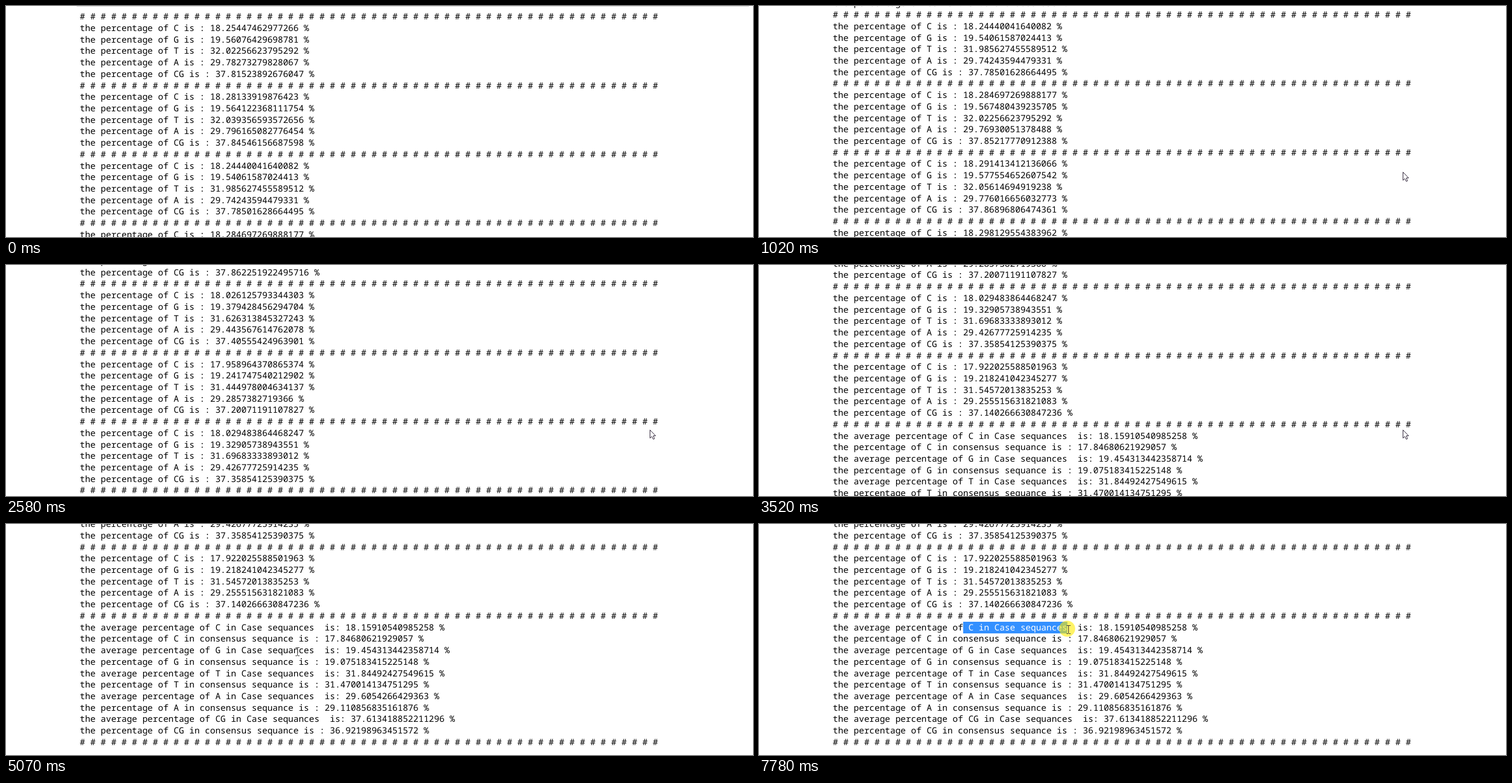
These frames come from a looping animation (1280x397 px, 8 s). An HTML page with a canvas:

```html
<!DOCTYPE html>
<html lang="en">
<head>
<meta charset="utf-8">
<title>Base percentages</title>
<style>
  html, body { margin: 0; width: 100%; height: 100%; overflow: hidden; background: #fff; }
  canvas { display: block; }
</style>
</head>
<body>
<canvas id="stage" width="1280" height="397"></canvas>
<script>
const ctx = document.getElementById('stage').getContext('2d');
const LOOP = 8000, FRAME = 78, WIDTH = 1280, HEIGHT = 397;
const LEFT = 126.6, CHAR = 8.929, LINE = 19.72, BASELINE = 23.25;
const NOTCH = 115.95; // scroll distance of one wheel notch

// Percentages follow from base counts (C, G, T, A) and the sequence length.
const BASES = ['C', 'G', 'T', 'A', 'CG'];
const withPair = ([c, g, t, a]) => [c, g, t, a, c + g];
const percentages = (counts, length) => withPair(counts.map(n => n / length * 100));

const samples = [
  [5436, 5825, 9536, 8869], [5444, 5826, 9541, 8873],
  [5433, 5819, 9525, 8857], [5445, 5827, 9536, 8865],
  [5447, 5830, 9546, 8867], [5449, 5826, 9532, 8867],
  [5368, 5771, 9418, 8768], [5348, 5730, 9364, 8721],
  [5369, 5756, 9439, 8763], [5337, 5723, 9394, 8712]
].map(counts => percentages(counts, 29779));
const consensus = percentages([5303, 5668, 9351, 8650], 29714);
const averages = withPair([0, 1, 2, 3].map(i => samples.reduce((sum, s) => sum + s[i], 0) / samples.length));

const rule = '# '.repeat(56).trim();
const lines = [
  ...samples.flatMap(values => [rule, ...values.map((v, i) => `the percentage of ${BASES[i]} is : ${v} %`)]),
  rule,
  ...BASES.flatMap((base, i) => [
    `the average percentage of ${base} in Case sequances  is: ${averages[i]} %`,
    `the percentage of ${base} in consensus sequance is : ${consensus[i]} %`
  ]),
  rule
];
const SELECTED_LINE = 6 * samples.length + 1, SELECTED_FROM = 25;

// Each move: first step time, last step time, target.
const scrolls = [
  [630, 860, 2], [1020, 1170, 3], [1790, 1950, 4],
  [2330, 2580, 6], [3210, 3520, 8], [4210, 4380, 9]
];
const POINTER_START = [1134, 315];
const SWEEP = 4610, PRESS = 7070;
const pointerMoves = [
  [70, 320, [1103.5, 285.5]], [1470, 1470, [1103.5, 283.5]],
  [SWEEP, 5070, [499.5, 219]], [5150, 5380, [467.5, 202.5]],
  [5460, 5690, [353.5, 176.5]], [5910, 6070, [366.5, 176]],
  [6300, 6380, [341.5, 175.5]], [6690, 6760, [355.5, 179.5]],
  [7240, 7320, [433.5, 179.5]], [7550, 7550, [486.5, 179.5]],
  [7700, 7780, [530.5, 180.5]]
];

const smooth = p => p * p * (3 - 2 * p);
const mix = (a, b, p) => a + (b - a) * p;

// Progress of a move that advances once per screen frame; lead shortens the first step.
function progress(t, [start, end], lead = 0) {
  if (t < start) return 0;
  if (t >= end) return 1;
  const count = Math.round((end - start) / FRAME) + 1;
  const done = 1 + Math.floor((t - start) * (count - 1) / (end - start) + 0.02);
  return (done - lead) / (count - lead);
}

const scrollAt = t => NOTCH * scrolls.reduce(
  (notches, move) => mix(notches, move[2], smooth(progress(t, move, 0.62))), 0);

const pointerAt = t => pointerMoves.reduce((from, move) => {
  const p = progress(t, move), eased = move[0] === SWEEP ? smooth(p) : p;
  return from.map((v, axis) => mix(v, move[2][axis], eased));
}, POINTER_START);

const baselineOf = (line, scroll) => Math.round(BASELINE + line * LINE - scroll);

function drawArrow(x, y) {
  const outline = [[0, 0], [0, 14], [3.2, 11.2], [5.6, 16], [7.8, 15], [5.6, 10.2], [9.6, 10]];
  ctx.beginPath();
  outline.forEach(([dx, dy]) => ctx.lineTo(x + dx, y + dy));
  ctx.closePath();
  ctx.fillStyle = '#fff';
  ctx.fill();
  ctx.strokeStyle = '#2b2035';
  ctx.lineWidth = 1;
  ctx.stroke();
}

function drawBeam(x, y) {
  const cx = Math.floor(x), top = Math.round(y - 7);
  ctx.fillStyle = '#3c3c3c';
  ctx.fillRect(cx, top, 1, 14);
  for (const edge of [top, top + 14]) {
    ctx.fillRect(cx - 3, edge, 3, 1);
    ctx.fillRect(cx + 1, edge, 3, 1);
  }
}

function drawLines(scroll, color) {
  ctx.fillStyle = color;
  lines.forEach((text, i) => {
    const y = baselineOf(i, scroll);
    if (y > -8 && y < HEIGHT + 16) ctx.fillText(text, LEFT, y);
  });
}

function drawSelection(x, scroll) {
  const length = Math.round((x - LEFT) / CHAR) - SELECTED_FROM;
  if (length <= 0) return;
  ctx.save();
  ctx.beginPath();
  ctx.rect(LEFT + SELECTED_FROM * CHAR, baselineOf(SELECTED_LINE, scroll) - 15, length * CHAR, 20);
  ctx.clip();
  ctx.fillStyle = '#3390ff';
  ctx.fillRect(0, 0, WIDTH, HEIGHT);
  drawLines(scroll, '#fff');
  ctx.restore();
}

function drawPressMark(x, y) {
  ctx.fillStyle = 'rgba(255, 235, 0, 0.6)';
  ctx.beginPath();
  ctx.arc(x - 2.5, y - 0.5, 13.8, 0, Math.PI * 2);
  ctx.fill();
}

function draw(t) {
  const scroll = scrollAt(t), [x, y] = pointerAt(t);
  ctx.fillStyle = '#fff';
  ctx.fillRect(0, 0, WIDTH, HEIGHT);
  ctx.fillStyle = '#cfcfcf';
  ctx.fillRect(121, -scroll, 1152, 1);

  ctx.font = '14.88px "Noto Sans Mono", monospace';
  ctx.textRendering = 'geometricPrecision';
  drawLines(scroll, '#000');

  if (t >= PRESS) {
    drawSelection(x, scroll);
    drawPressMark(x, y);
  }
  if (t >= pointerMoves[0][0]) (x < 760 ? drawBeam : drawArrow)(x, y);
}

const begin = performance.now();
function tick() {
  draw((performance.now() - begin) % LOOP);
  requestAnimationFrame(tick);
}
tick();
</script>
</body>
</html>
```
